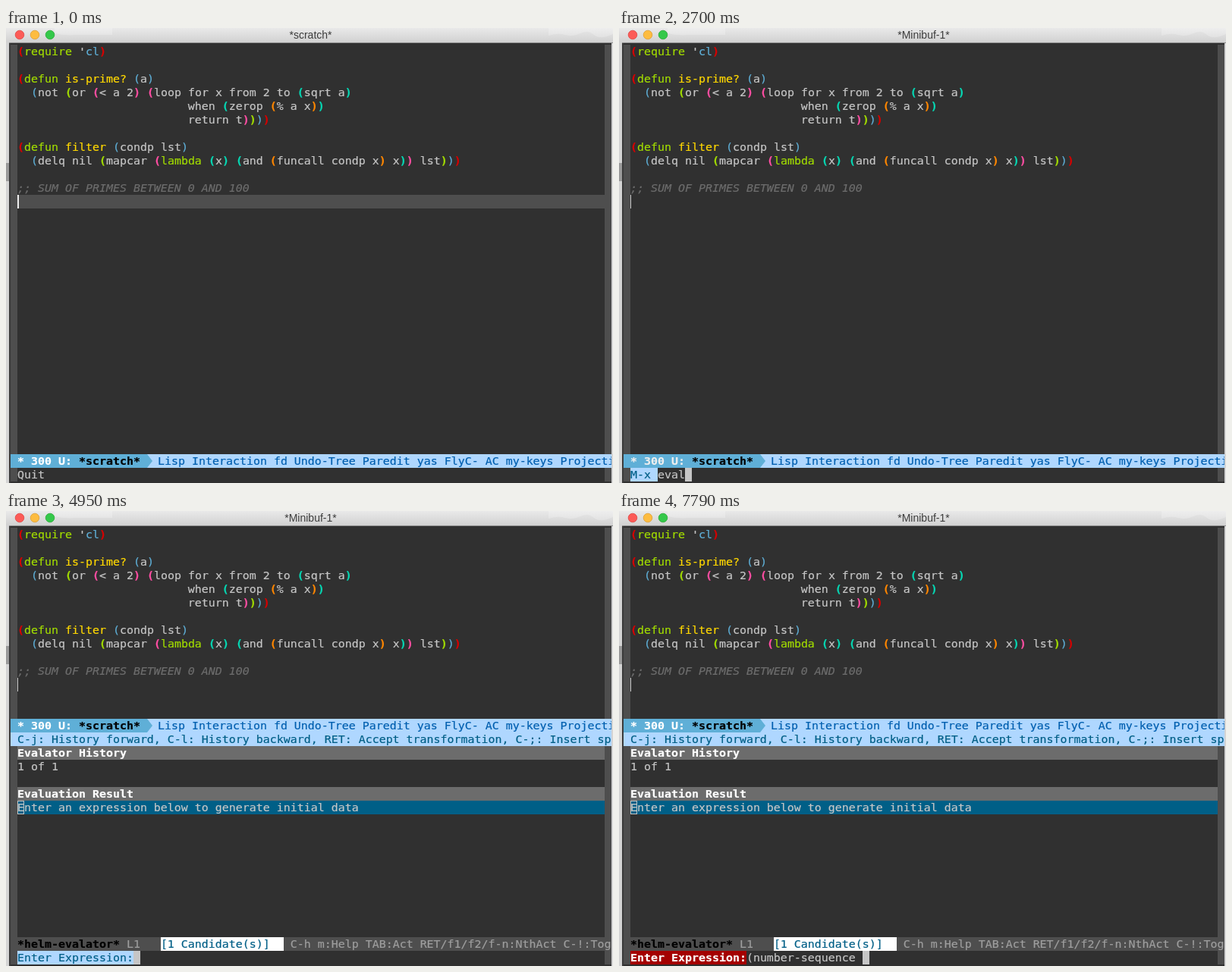
Animation, 800 px wide and 600 px high, one loop 8 s. Source, as an HTML page:

```html
<!DOCTYPE html>
<html lang="en">
<head>
<meta charset="utf-8">
<title>scratch</title>
<style>
html, body { margin: 0; width: 100%; height: 100%; overflow: hidden; }
#stage {
  position: relative; width: 800px; height: 600px; overflow: hidden; background: #d4d4d4;
  font: 14.95px/18px "DejaVu Sans Mono", monospace; color: #c6c6c6;
  -webkit-text-stroke: .2px;
}
#stage div { position: absolute; white-space: pre; }
svg { position: absolute; left: 0; top: 0; }
#title {
  left: 0; width: 803px; top: 0; height: 19px; line-height: 19px; text-align: center;
  font-family: "Liberation Sans", Arial, sans-serif; font-size: 14px; color: #3c3c3c;
  -webkit-text-stroke: 0;
}
#edge { left: 4px; top: 20px; width: 2px; height: 580px; background: #3a3a3a; }
#win { left: 6px; top: 20px; width: 792px; height: 580px; overflow: hidden; background: #303030; }
#code, #helm { left: 0; top: 0; }
#stage .fringe { top: 2px; width: 9px; height: 576px; background: #4e4e4e; }
.row { left: 9px; height: 18px; }
.full { width: 774px; }
#stage .wide { left: 0; width: 783px; padding-left: 9px; }
.hl { background: #4e4e4e; }
.head { background: #6c6c6c; color: #fff; font-weight: bold; }
.pick { background: #005f87; }
.help { background: #afd7ff; color: #005f87; }
.status { background: #4e4e4e; color: #9e9e9e; }
.status b { color: #000; }
.status span { display: inline-block; height: 18px; background: #fff; color: #005f87; vertical-align: top; }
#mode { left: 0; width: 792px; height: 18px; background: #afd7ff; color: #005faf; }
#mode div { top: 0; height: 18px; }
#mode .seg { left: 0; width: 171px; padding-left: 9px; background: #5fafd7; font-weight: bold; color: #000; }
#mode .tip { left: 180px; width: 7px; background: #5fafd7; clip-path: polygon(0 0, 100% 50%, 0 100%); }
#mode .minor { left: 194px; }
.box { left: 9px; width: 7px; height: 16px; border: 1px solid #c6c6c6; }
#point { left: 9px; top: 200px; height: 18px; }
#block { top: 560px; width: 9px; height: 18px; background: #c6c6c6; }
#prompt { display: inline-block; height: 18px; background: #afd7ff; color: #005f87; vertical-align: top; }
#prompt.err { background: #a40000; color: #fff; font-weight: bold; }
.key { color: #a1db00; }
.fn { color: #ffd700; }
.sym { color: #5fafd7; }
.com { color: #6c6c6c; font-style: italic; }
</style>
</head>
<body>
<div id="stage">
  <svg width="800" height="600">
    <defs>
      <linearGradient id="bar" x2="0" y2="1">
        <stop stop-color="#e9e9e9"/><stop offset="1" stop-color="#d1d1d1"/>
      </linearGradient>
    </defs>
    <rect width="800" height="19" fill="url(#bar)"/>
    <path d="M715 10q12-4 22-1t20-2 18 2 25-1V0H715zM64 7q12 3 26 2h50V0H64z" fill="#fff" opacity=".22"/>
    <rect x="4" y="19" width="796" height="1" fill="#8d8d8d"/>
    <rect y="178" width="4" height="24" fill="#9a9a9a"/>
    <g stroke-width=".8">
      <circle cx="18" cy="9" r="5.8" fill="#fc5b57" stroke="#df4744"/>
      <circle cx="38" cy="9" r="5.8" fill="#fdbc40" stroke="#de9f34"/>
      <circle cx="58" cy="9" r="5.8" fill="#34c84a" stroke="#27aa35"/>
    </g>
  </svg>
  <div id="title"></div>
  <div id="edge"></div>
  <div id="win">
    <div class="fringe" style="left:0"></div>
    <div class="fringe" style="left:783px"></div>
    <div class="row full hl" id="line" style="top:200px"></div>
    <div id="code"></div>
    <div id="point"></div>
    <div id="helm"></div>
    <div id="mode"><div class="seg"><span id="state">* 300 U:</span> *scratch*</div><div class="tip"></div><div class="minor">Lisp Interaction fd Undo-Tree Paredit yas FlyC- AC my-keys Projectile</div></div>
    <div class="row" style="top:560px"><span id="prompt"></span><span id="input"></span></div>
    <div id="block"></div>
  </div>
</div>
<script>
const LOOP = 8000, OPEN = 1800, HELM = 3900, CELL = 9;
const $ = id => document.getElementById(id);
const rowTop = n => 2 + 18 * n;
const row = (n, html, cls = '') => `<div class="row ${cls}" style="top:${rowTop(n)}px">${html}</div>`;

// Markup: K{keyword} F{function} S{symbol} C{comment}
const lines = [
  "(K{require} 'S{cl})",
  '',
  '(K{defun} F{is-prime?} (a)',
  '  (not (or (< a 2) (loop for x from 2 to (sqrt a)',
  '                         when (zerop (% a x))',
  '                         return t))))',
  '',
  '(K{defun} F{filter} (condp lst)',
  '  (delq nil (mapcar (K{lambda} (x) (and (funcall condp x) x)) lst)))',
  '',
  'C{;; SUM OF PRIMES BETWEEN 0 AND 100}'
];
const faces = { K: 'key', F: 'fn', S: 'sym', C: 'com' };
const rainbow = ['#d70000', '#5fafd7', '#a1db00', '#ff4ea3', '#06d8b4', '#ff8700'];
let depth = 0;

function paren(c) {
  const d = c === '(' ? depth++ : --depth;
  return `<span style="color:${rainbow[d]};font-weight:${d === 1 ? 400 : 700}">${c}</span>`;
}

function paint(s) {
  return s.replace(/</g, '&lt;')
    .replace(/[()]/g, paren)
    .replace(/([KFSC])\{(.*?)\}/g, (m, k, text) => `<span class="${faces[k]}">${text}</span>`);
}

$('code').innerHTML = lines.map((s, i) => row(i, paint(s))).join('');

$('helm').innerHTML =
  row(15, 'C-j: History forward, C-l: History backward, RET: Accept transformation, C-;: Insert special', 'wide help') +
  row(16, 'Evalator History', 'full head') +
  row(17, '1 of 1') +
  row(19, 'Evaluation Result', 'full head') +
  row(20, 'Enter an expression below to generate initial data', 'full pick') +
  `<div class="box" style="top:${rowTop(20)}px"></div>` +
  row(30, '<b>*helm-evalator*</b> L1   <span>[1 Candidate(s)]  </span> C-h m:Help TAB:Act RET/f1/f2/f-n:NthAct C-!:Toggle', 'wide status');

const command = 'evalator', expr = '(number-sequence ';
const commandKeys = [...command].map((c, i) => 2250 + 150 * i);
const exprKeys = [5100, 5250, 5550, 5700, 5850, 6000, 6150, 6450, 6600,
  6750, 6900, 6900, 7050, 7350, 7500, 7790, 7790];

const typed = (text, keys, t) => text.slice(0, keys.filter(k => k <= t).length);
const within = (t, a, b) => t >= a && t < b;
const show = (id, on) => { $(id).style.display = on ? 'block' : 'none'; };

function draw(t) {
  const mini = t >= OPEN, helm = t >= HELM;
  const prompt = helm ? 'Enter Expression:' : mini ? 'M-x ' : '';
  const input = helm ? typed(expr, exprKeys, t) : mini ? typed(command, commandKeys, t) : 'Quit';

  $('title').textContent = mini ? '*Minibuf-1*' : '*scratch*';
  $('prompt').textContent = prompt;
  $('prompt').className = t >= exprKeys[0] ? 'err' : '';
  $('input').textContent = input;
  $('block').style.left = 9 + CELL * (prompt.length + input.length) + 'px';
  $('mode').style.top = rowTop(helm ? 14 : 30) + 'px';
  $('state').style.color = mini && !helm ? '#eee' : '#fff';
  $('point').style.width = mini ? '1px' : '2px';
  $('point').style.background = mini ? '#c6c6c6' : '#eee';

  show('line', !mini);
  show('helm', helm);
  show('point', !within(t, 150, 600) && !within(t, 1200, 1650));
  show('block', mini && !within(t, 3750, HELM) && !within(t, 4350, 4950));
}

function tick() {
  draw(performance.now() % LOOP);
  requestAnimationFrame(tick);
}
tick();
</script>
</body>
</html>
```
